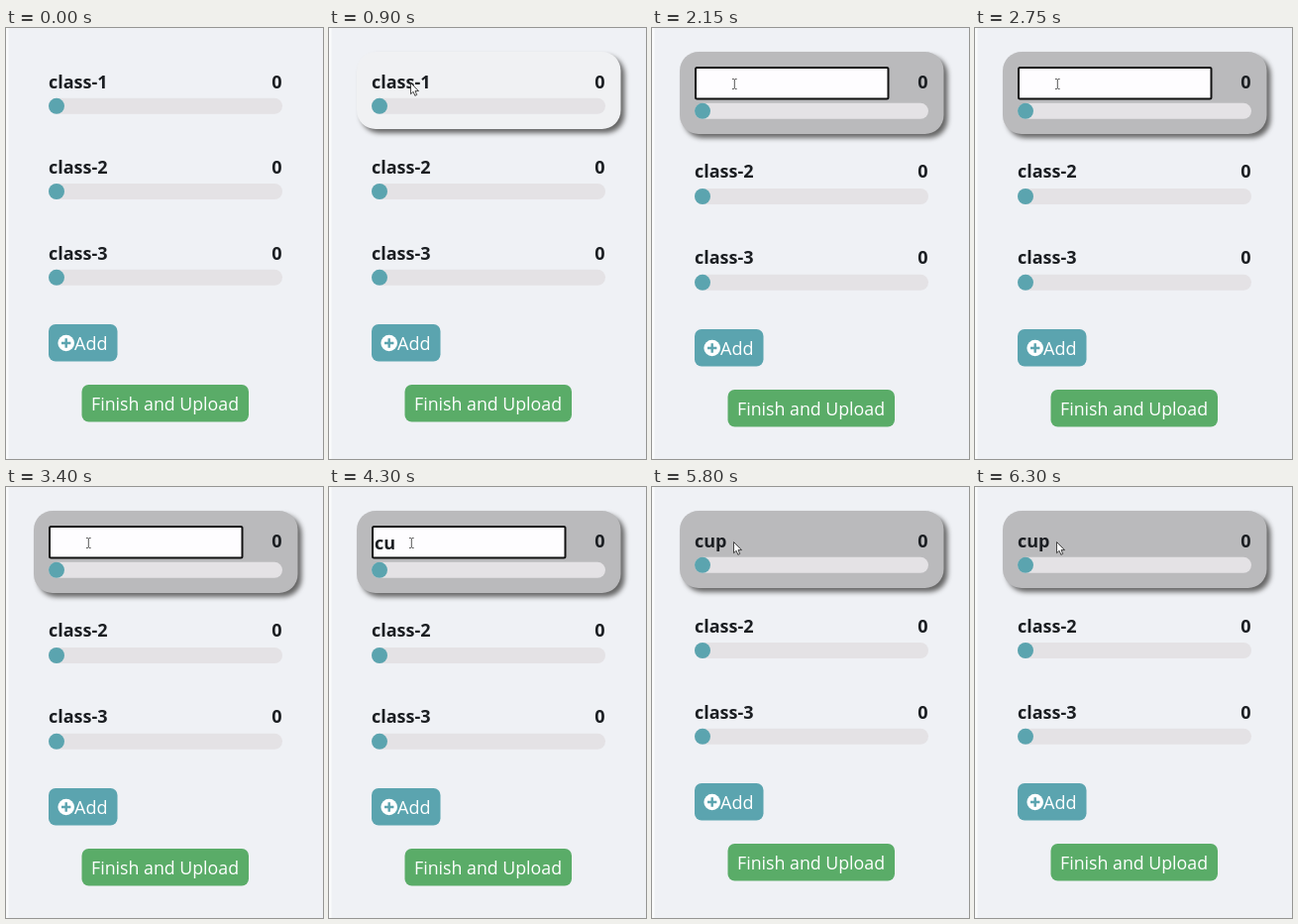
Animation of 320x435 px, one loop 6350 ms. Source, as an HTML page:

```html
<!DOCTYPE html>
<html lang="en">
<head>
<meta charset="utf-8">
<title>Class list</title>
<style>
  html, body { margin: 0; width: 100%; height: 100%; overflow: hidden; background: #eff1f5; }
  svg { display: block; width: 320px; height: 435px; }
  text { font: 18px "Open Sans", "Noto Sans", sans-serif; fill: #fff; }
  .bold { font-weight: 700; fill: #1b1e22; }
  .end { text-anchor: end; }
  .track { fill: #e4e2e5; }
  .teal { fill: #5ba4af; }
  .card { filter: drop-shadow(4px 4px 2.5px #666); }
</style>
</head>
<body>
<svg viewBox="0 0 320 435">
  <rect width="2.5" height="435" fill="#fafbfc"/>
  <rect id="card" class="card" x="28" y="24" width="266.5" rx="19"/>
  <g id="rows"></g>
  <rect id="field" x="44" y="40" width="194.5" height="31.5" rx="1.5" fill="#fefdff" stroke="#111" stroke-width="2"/>
  <text id="name" class="bold"></text>
  <g data-shift="5">
    <rect class="teal" x="43" y="299" width="69.5" height="37.5" rx="7"/>
    <circle cx="60.7" cy="318" r="8.3" fill="#fff"/>
    <path d="M56 318h9.4M60.7 313.3v9.4" stroke="#5ba4af" stroke-width="2.4"/>
    <text x="69" y="325">Add</text>
    <rect x="76.5" y="360" width="168.5" height="37.5" rx="7" fill="#5aac68"/>
    <text x="86" y="386" style="font-size:17.75px">Finish and Upload</text>
  </g>
  <path id="arrow" d="M0 0V11.2L2.6 8.8L4.3 12.8L6.2 12L4.5 8.1H8Z" fill="#fff" stroke="#333" stroke-width=".9"/>
  <path id="beam" d="M81 51.5H82.6L83.3 52.2L84 51.5H85.6M83.3 52V61M81 61.5H82.6L83.3 60.8L84 61.5H85.6" fill="none" stroke="#555"/>
</svg>
<script>
const LOOP = 6350;
const ENTER = 200, ARRIVE = 650, HOVER = 380;
const OVER_TEXT = 1400, EDIT = 1900, COMMIT = 5600;
const KEYS = [4000, 4300, 4600];
const WORD = "cup";

const $ = id => document.getElementById(id);
const clamp = v => Math.max(0, Math.min(1, v));
const ease = v => 1 - (1 - v) ** 3;

$("rows").innerHTML = [0, 1, 2].map(i => {
  const y = [61, 147, 234][i];
  const mid = [78.8, 165, 251.8][i];
  const label = i ? `<text class="bold" data-shift="4" x="43" y="${y}">class-${i + 1}</text>` : "";
  return `${label}
    <text class="bold end" data-shift="${i ? 4 : 0}" x="278.5" y="${y}">0</text>
    <g data-shift="5">
      <rect class="track" x="43" y="${mid - 8}" width="236" height="16" rx="8"/>
      <circle class="teal" cx="51" cy="${mid}" r="8"/>
    </g>`;
}).join("");

const movers = [...document.querySelectorAll("[data-shift]")];
const show = (id, on) => $(id).setAttribute("visibility", on ? "visible" : "hidden");

function render(t) {
  const editing = t >= EDIT && t < COMMIT;
  const typed = WORD.slice(0, KEYS.filter(k => t >= k).length);

  for (const el of movers)
    el.setAttribute("transform", `translate(0 ${editing ? el.dataset.shift : 0})`);

  const card = $("card");
  card.setAttribute("height", editing ? 83 : 78);
  card.setAttribute("fill", t >= EDIT ? "#bababc" : "#f0f1f3");
  card.setAttribute("opacity", clamp((t - HOVER) / 200));

  const name = $("name");
  name.textContent = t < EDIT ? "class-1" : typed;
  name.setAttribute("x", editing ? 46 : 43);
  name.setAttribute("y", editing ? 63 : 61);
  show("field", editing);

  const p = ease(clamp((t - ENTER) / (ARRIVE - ENTER)));
  $("arrow").setAttribute("transform", `translate(${-12 + 94.5 * p} ${75 - 19.5 * p})`);
  const beam = t >= OVER_TEXT && t < COMMIT;
  show("beam", beam);
  show("arrow", !beam && t >= ENTER);
}

const start = performance.now();
function tick() {
  render((performance.now() - start) % LOOP);
  requestAnimationFrame(tick);
}
tick();
</script>
</body>
</html>
```
